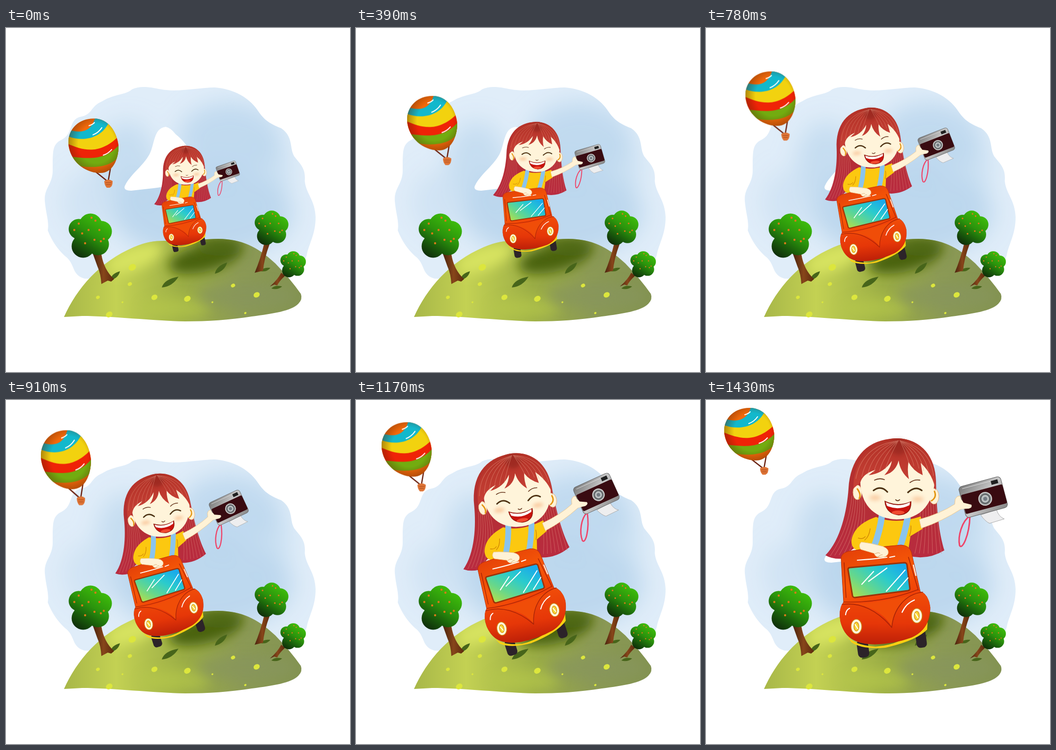
These frames come from a looping animation (700x700 px, 1560 ms). An HTML page:

```html
<!DOCTYPE html>
<html lang="en">
<head>
<meta charset="utf-8">
<title>Road trip</title>
<style>
html, body { margin: 0; width: 100%; height: 100%; overflow: hidden; background: #fff; }
svg { display: block; width: 100vw; height: 100vh; }
.line { fill: none; stroke-linecap: round; stroke-linejoin: round; }
</style>
</head>
<body>
<svg viewBox="0 0 700 700">
<defs>
  <filter id="soft" x="-60%" y="-60%" width="220%" height="220%"><feGaussianBlur stdDeviation="24"/></filter>
  <filter id="mid" x="-60%" y="-60%" width="220%" height="220%"><feGaussianBlur stdDeviation="12"/></filter>
  <filter id="fine" x="-60%" y="-60%" width="220%" height="220%"><feGaussianBlur stdDeviation="4"/></filter>
  <linearGradient id="hillFill"><stop offset="0" stop-color="#a8b748"/><stop offset=".22" stop-color="#c3d153"/><stop offset=".5" stop-color="#9cae46"/><stop offset=".75" stop-color="#8c9a55"/><stop offset="1" stop-color="#839351"/></linearGradient>
  <linearGradient id="leafFill" gradientUnits="userSpaceOnUse" x1="198" y1="385" x2="146" y2="464"><stop offset="0" stop-color="#3fc00b"/><stop offset=".45" stop-color="#2b930c"/><stop offset=".75" stop-color="#195b0b"/><stop offset="1" stop-color="#102f0a"/></linearGradient>
  <linearGradient id="barkFill"><stop offset="0" stop-color="#4a230e"/><stop offset=".5" stop-color="#87451a"/><stop offset="1" stop-color="#5b2a0e"/></linearGradient>
  <linearGradient id="hairFill" x2="0" y2="1"><stop offset="0" stop-color="#b83328"/><stop offset=".4" stop-color="#b32f32"/><stop offset="1" stop-color="#b92b40"/></linearGradient>
  <linearGradient id="bangFill" x2="0" y2="1"><stop offset="0" stop-color="#b23126"/><stop offset="1" stop-color="#c94238"/></linearGradient>
  <linearGradient id="carFill" x2=".3" y2="1"><stop offset="0" stop-color="#e03c08"/><stop offset=".4" stop-color="#f75807"/><stop offset=".75" stop-color="#ee3b08"/><stop offset="1" stop-color="#c91d06"/></linearGradient>
  <linearGradient id="fenderFill" x2="0" y2="1"><stop offset="0" stop-color="#f04c09"/><stop offset=".6" stop-color="#e63708"/><stop offset="1" stop-color="#be2008"/></linearGradient>
  <linearGradient id="glassFill" x1="0" y1="1" x2="1" y2=".3"><stop offset="0" stop-color="#c6e03c"/><stop offset=".35" stop-color="#66d78c"/><stop offset=".68" stop-color="#2acbcd"/><stop offset="1" stop-color="#1aaaea"/></linearGradient>
  <linearGradient id="silver" x2="1" y2="1"><stop offset="0" stop-color="#787878"/><stop offset=".5" stop-color="#c8c8c8"/><stop offset="1" stop-color="#858585"/></linearGradient>
  <radialGradient id="shade" cx=".56" cy=".46" r=".6"><stop offset=".6" stop-color="#5a2200" stop-opacity="0"/><stop offset="1" stop-color="#5a2200" stop-opacity=".5"/></radialGradient>
  <path id="sky" d="M280 120C300 120 315 127 342 127S400 121 425 121C465 124 495 143 511 166C523 184 532 193 560 204C586 222 576 245 587 262C601 279 610 287 608 312C611 338 629 350 630 385C630 420 616 440 612 462Q604 492 575 510L160 510C132 502 142 480 120 464Q97 443 85 412C88 393 81 378 79 352C77 326 95 318 95 290C95 250 94 236 114 227C137 215 127 188 150 181C177 177 170 160 196 149C220 134 245 136 256 125Q267 120 280 120Z"/>
  <path id="hill" d="M118 588C144 530 190 476 260 446C300 429 325 433 360 435C385 433 405 429 432 429C480 430 510 444 548 479Q579 511 600 541Q604 552 595 561C580 576 545 581 500 587C455 594 410 597 365 597C300 596 215 586 155 586Q138 587 118 588Z"/>
  <path id="egg" d="M37 65C36 35 60 16 88 16C118 15 136 42 139 70C139 98 126 124 100 123C70 122 40 100 37 65Z"/>
  <clipPath id="inSky"><use href="#sky"/></clipPath>
  <clipPath id="inHill"><use href="#hill"/></clipPath>
  <clipPath id="inEgg"><use href="#egg"/></clipPath>
  <g id="crown">
    <g fill="url(#leafFill)"><circle cx="148" cy="409" r="20.5"/><circle cx="172" cy="401" r="23.5"/><circle cx="194" cy="414" r="21.5"/><circle cx="187" cy="440" r="22.5"/><circle cx="157" cy="444" r="23.5"/><circle cx="171" cy="424" r="32"/></g>
    <path class="line" stroke="#d97a18" stroke-width="4.4" d="M174 386h0M182 392h0M148 398h0M139 411h0M168 411h0M190 411h0M180 431h0M193 434h0M161 438h0M199 429h0M155 418h0"/>
  </g>
</defs>

<!-- landscape -->
<use href="#sky" fill="#e0edf9"/>
<g clip-path="url(#inSky)" fill="#b4d2ec" filter="url(#soft)">
  <ellipse cx="455" cy="225" rx="105" ry="75" opacity=".7"/>
  <ellipse cx="400" cy="375" rx="185" ry="95" opacity=".8"/>
  <ellipse cx="245" cy="270" rx="60" ry="80" opacity=".6"/>
  <ellipse cx="165" cy="355" rx="50" ry="65" opacity=".35"/>
  <ellipse cx="545" cy="285" rx="35" ry="60" opacity=".45"/>
</g>
<path fill="#fff" d="M325 201Q335 203 345 216Q358 226 368 240L345 320L300 326L255 331Q236 331 243 319C255 296 278 282 292 257C303 236 300 204 325 201Z"/>
<use href="#hill" fill="url(#hillFill)"/>
<g clip-path="url(#inHill)">
  <ellipse cx="262" cy="468" rx="60" ry="24" fill="#d7e360" filter="url(#mid)" transform="rotate(-22 262 468)"/>
  <ellipse cx="345" cy="570" rx="70" ry="22" fill="#b7c94c" filter="url(#mid)" opacity=".6"/>
  <ellipse cx="490" cy="545" rx="100" ry="26" fill="#87955d" filter="url(#mid)" opacity=".7"/>
  <ellipse cx="405" cy="468" rx="76" ry="27" fill="#4a6211" filter="url(#mid)" transform="rotate(-14 405 468)"/>
  <ellipse cx="435" cy="442" rx="48" ry="13" fill="#4d6714" filter="url(#mid)"/>
</g>
<g id="dots" fill="#dce63d"></g>
<path fill="#47651a" d="M317 528Q322 511 351 506Q339 526 317 528ZM425 500Q428 484 450 477Q445 495 425 500ZM212 513Q215 499 232 495Q228 510 212 513ZM518 495Q524 486 538 488Q531 497 518 495ZM540 530Q548 522 562 526Q552 534 540 530Z"/>
<g fill="url(#barkFill)">
  <path d="M177 460L194 460Q199 492 220 511L214 516L207 514L194 521Q193 500 186 485Z"/>
  <path d="M526 436L537 438Q525 470 523 494L506 498Q518 470 526 436Z"/>
  <path d="M560 498L568 504Q555 516 552 524L546 522L537 526Q553 512 560 498Z"/>
</g>
<use href="#crown"/>
<use href="#crown" transform="translate(540 407) scale(.78) translate(-171 -423)"/>
<use href="#crown" transform="translate(584 481) scale(.59) translate(-171 -423)"/>

<!-- balloon -->
<g id="balloon">
  <path class="line" stroke="#6b2313" stroke-width="2.5" d="M93 121L116 139M123 111L118 139"/>
  <use href="#egg" fill="#f26a0b"/>
  <g clip-path="url(#inEgg)">
    <path fill="#12b8cc" d="M38 38Q82 52 92 12L122 18L120 60L34 60Z"/>
    <path fill="#f2d20f" d="M34 50C65 63 106 56 121 20L148 44L130 90L34 80Z"/>
    <path fill="#ef2307" d="M34 65C62 76 98 92 142 48L142 90L34 100Z"/>
    <path fill="#72ac10" d="M34 90C74 94 110 102 142 66L142 88C122 114 84 114 52 108Z"/>
  </g>
  <use href="#egg" fill="url(#shade)"/>
  <path class="line" stroke="#fff" stroke-width="2" d="M87 48Q98 44 105 34M108 88Q118 85 125 77M79 30Q86 28 90 24"/>
  <path fill="#de7436" d="M110 139Q118 133 127 139Q127 150 121 152H115Q110 147 110 139Z"/>
  <path class="line" stroke="#a84a1b" stroke-width="1" d="M113 142h11M114 146h9"/>
</g>

<!-- girl in the car -->
<g id="ride">
  <g fill="#2c2329"><rect x="308" y="488" width="23" height="36" rx="8" transform="rotate(-8 320 506)"/><rect x="427" y="466" width="21" height="38" rx="8" transform="rotate(-8 438 485)"/></g>
  <path fill="url(#hairFill)" d="M243 316C274 285 287 225 290 180C294 115 330 78 390 78C440 80 467 117 468 165C469 225 474 270 485 306Q450 327 412 317L340 250L304 300Q290 309 276 323Q257 324 243 316Z"/>
  <g id="locks" class="line" stroke="#dd8078" stroke-width="1.1" opacity=".55"></g>
  <g fill="#fff2d6" stroke="#e2ab75"><ellipse cx="308" cy="188" rx="9" ry="15"/><ellipse cx="464" cy="196" rx="10" ry="16"/></g>
  <path class="line" stroke="#e3950f" stroke-width="3" d="M308 181Q316 192 312 200M465 186Q470 198 459 205"/>
  <path fill="#fcc810" d="M346 238Q385 254 437 237L441 262L416 277L411 310L330 306L309 306Q295 302 296 285C301 259 323 246 346 238Z"/>
  <path class="line" stroke="#d18705" stroke-width="1.5" d="M334 262Q332 278 323 285M414 277Q418 266 417 256M310 281Q319 284 324 278"/>
  <path class="line" stroke="#8ac4ed" stroke-width="13" stroke-linecap="butt" d="M358 235Q354 267 342 298M410 240Q405 270 394 301"/>
  <path fill="#fff4da" d="M314 165C314 205 335 241 388 243C438 243 463 210 466 160L445 105H340Z"/>
  <path fill="#f9c99f" filter="url(#fine)" d="M332 199a12 5 0 1 0 24 0a12 5 0 1 0-24 0M419 202a12 5 0 1 0 24 0a12 5 0 1 0-24 0"/>
  <path fill="url(#bangFill)" d="M300 180C299 120 340 78 390 78C445 80 470 125 467 185Q463 153 437 128L441 153Q421 144 412 126Q409 145 413 161Q395 146 392 123Q386 147 363 153Q376 139 378 124Q361 150 331 153L345 142Q319 150 314 168Z"/>
  <ellipse cx="392" cy="96" rx="17" ry="16" fill="#7d1a18" opacity=".4" filter="url(#fine)"/>
  <g id="strands" class="line" stroke="#e89a83" stroke-width="1.1" opacity=".5"></g>
  <path class="line" stroke="#6b3a22" stroke-width="1.8" d="M343 163Q353 158 363 162M415 168Q424 161 435 163M386 203Q390 207 394 203"/>
  <path class="line" stroke="#4c3112" stroke-width="3.2" d="M341 184Q356 173 369 187M411 188Q426 174 439 184"/>
  <path fill="#c9130e" stroke="#8d1b10" stroke-width="1.5" d="M364 206Q390 219 417 207Q418 233 392 234Q366 231 364 206Z"/>
  <path fill="#fff" d="M366 208Q390 220 415 208L414 214Q390 226 368 215Z"/>
  <ellipse cx="391" cy="229" rx="13" ry="4" fill="#f04a30"/>
  <path fill="#fff2d6" stroke="#edc68d" d="M434 243Q475 232 506 212L507 202Q512 192 520 197L526 208L541 213Q543 219 535 221L519 222Q480 247 438 261Z"/>
  <!-- camera -->
  <path class="line" stroke="#ef4468" stroke-width="3" d="M537 236C521 246 512 277 516 296C521 306 536 276 537 236"/>
  <path fill="#eeeeef" stroke="#aaa" d="M559 234L591 223Q596 238 607 242L577 251Q568 247 559 234Z"/>
  <g transform="rotate(-15 564 197)">
    <rect x="520" y="165" width="88" height="65" rx="7" fill="url(#silver)" stroke="#606060"/>
    <rect x="521" y="182" width="87" height="40" rx="3" fill="#390b11"/>
    <path stroke="#ddd" d="M527 170H600"/>
    <rect x="587" y="170" width="14" height="8" fill="#202020"/>
    <circle cx="567" cy="202" r="13" fill="#858888" stroke="#d1d3d3" stroke-width="2"/>
    <circle cx="567" cy="202" r="9" fill="#babfc0" stroke="#565b60" stroke-width="2"/>
    <circle cx="567" cy="202" r="4" fill="#737b83"/>
  </g>
  <path fill="#fff2d6" d="M510 202Q519 198 524 209L540 213Q543 218 535 221L518 222Z"/>
  <!-- car -->
  <path fill="#fccf13" d="M285 478Q300 499 345 502Q400 499 451 452L450 467Q428 490 365 504Q318 508 296 493Z"/>
  <path fill="url(#carFill)" stroke="#b93007" d="M275 325Q273 313 289 308Q342 299 397 295Q414 296 418 310L436 390Q452 394 456 422C456 452 443 472 418 483Q382 496 344 497C306 496 283 486 274 451Q269 428 280 411Z"/>
  <path fill="url(#fenderFill)" d="M276 417C310 409 348 427 378 463C380 430 400 394 441 392Q457 405 456 426C454 458 439 475 415 484Q380 496 343 496C299 495 282 482 274 452Q270 430 276 417Z"/>
  <path fill="#f04d08" d="M309 416Q354 423 378 461Q382 422 417 398Q360 410 309 416Z"/>
  <path class="line" stroke="#a92407" stroke-width="1.6" d="M277 416C314 411 349 428 378 463C381 428 403 395 441 391M281 411Q357 414 431 386M281 331L285 402M412 320L432 387"/>
  <path fill="url(#glassFill)" stroke="#9c3208" stroke-width="3" stroke-linejoin="round" d="M289 345Q289 341 293 341L403 331Q408 331 409 335L415 384Q415 387 411 388L303 402Q299 402 298 398Z"/>
  <path class="line" stroke="#fff" stroke-width="2.2" d="M317 375L341 349M331 369L368 342M367 389L405 346M390 386L411 362M308 326Q340 324 368 320M374 320L384 318M422 336L427 357M399 432Q407 414 424 407M284 437Q285 427 292 424"/>
  <g id="lamp"><ellipse cx="306" cy="461" rx="11" ry="15" fill="#fff9dc" stroke="#cf7a10" stroke-width="1.5"/><ellipse cx="306" cy="461" rx="5" ry="9" fill="#f7d637" stroke="#d79412" stroke-width="1.5"/><path stroke="#fff" stroke-width="2" d="M303 456L309 466"/></g>
  <use href="#lamp" x="123" y="-22"/>
  <path fill="#fff2d6" stroke="#edc68d" d="M316 289Q337 291 360 298Q372 303 371 311Q369 320 356 320Q345 321 342 312L315 304Q309 296 316 289Z"/>
  <path class="line" stroke="#d7a469" d="M344 313Q351 309 354 312M350 319Q356 314 359 315"/>
</g>
</svg>
<script>
const $ = id => document.getElementById(id);
const STEP = 130, STEPS = 12;

// Pose rows at step 0, then 1, 3, 5, 7, 9, 11:
// ride x, y, scale, tilt; balloon x, y
const poses = [
  [395, 359.5, .48, -4, 208, 325],
  [386.5, 351.5, .555, -8.5, 199, 308],
  [399, 347, .618, -1.2, 185, 279],
  [401, 349, .704, -2.4, 170, 245],
  [373.5, 339, .78, -9.9, 152, 214],
  [395, 329.5, .91, -9.4, 133, 186],
  [437, 331.5, 1, 0, 118, 152]
];
const stretch = [1.035, 1.12, 1];

function poseAt(k) {
  if (k === 0 || k % 2) return poses[Math.ceil(k / 2)];
  const i = k / 2, [a, b, c, d] = [i - 1, i, i + 1, Math.min(i + 2, 6)].map(n => poses[n]);
  return b.map((v, j) => (9 * (v + c[j]) - a[j] - d[j]) / 16);
}

function draw(now) {
  const k = Math.floor(now / STEP) % STEPS;
  const [x, y, size, tilt, bx, by] = poseAt(k);
  $('ride').setAttribute('transform',
    `translate(${x} ${y}) rotate(${tilt}) scale(${size}) translate(-437 -331.5)`);
  $('balloon').setAttribute('transform',
    `translate(${bx} ${by}) scale(1 ${stretch[k % 3]}) translate(-118 -152)`);
  requestAnimationFrame(draw);
}

const path = d => `<path d="${d}"/>`;
let locks = '', strands = '';
for (let i = 0; i < 7; i++) {
  locks += path(`M${297 + i * 4} 195Q${292 + i * 6} 260 ${253 + i * 9} ${317 - i}`)
    + path(`M${467 - i * 5} 205Q${472 - i * 6} 265 ${479 - i * 9} 312`);
  if (i < 6) strands += path(`M391 83Q${318 + i * 11} ${92 + i * 5} ${305 + i * 12} ${160 - i * 4}`)
    + path(`M395 83Q${455 - i * 9} ${96 + i * 4} ${463 - i * 10} ${154 - i * 5}`);
}
$('locks').innerHTML = locks;
$('strands').innerHTML = strands;

$('dots').innerHTML = [
  [257, 487, 8], [187, 548, 4], [302, 548, 6.5], [369, 551, 7], [462, 524, 4.5], [510, 543, 6.5],
  [210, 583, 7], [252, 521, 4.5], [487, 580, 2.5], [420, 558, 2], [237, 558, 2]
].map(([x, y, r]) => `<ellipse cx="${x}" cy="${y}" rx="${r}" ry="${r * .8}" transform="rotate(-30 ${x} ${y})"/>`).join('');

requestAnimationFrame(draw);
</script>
</body>
</html>
```
